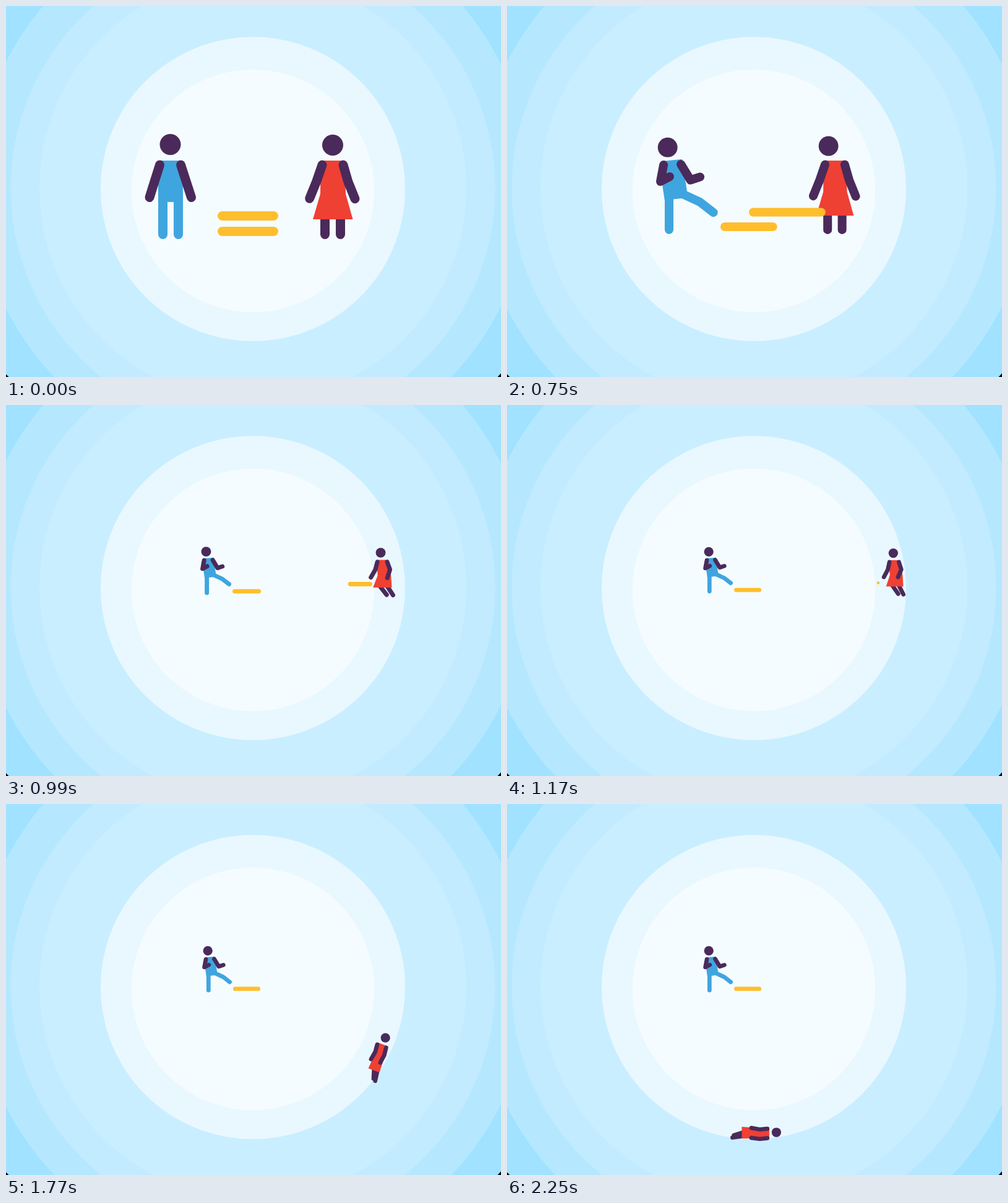
Recreate the animation shown at these times as an HTML page with a canvas. Size 800 px wide and 600 px high, loop 2700 ms.

```html
<!DOCTYPE html>
<html lang="en">
<head>
<meta charset="utf-8">
<title>Unequal</title>
<style>
  html, body { margin: 0; width: 100%; height: 100%; overflow: hidden; background: #a0e2ff; }
  canvas { display: block; width: 100vw; height: 100vh; }
</style>
</head>
<body>
<canvas id="stage" width="800" height="600"></canvas>
<script>
const ctx = document.getElementById('stage').getContext('2d');
const LOOP = 2700, STEP = 30, SLIDE = 1410, LANDED = 2250;
const SKIN = '#4a2a5a', BLUE = '#3fa5df', RED = '#ef4034', GOLD = '#ffbe2c';
const ZOOM = { x: 387.4, y: 245.6 };
const RING = { x: 399, y: 296 };
const PIVOT = { x: 528, y: 300 };
const RAD = Math.PI / 180;

// Progress from 0 to 1 between two times, and its eased forms
const part = (t, a, b) => Math.min(1, Math.max(0, (t - a) / (b - a)));
const ease = (t, a, b) => { const u = part(t, a, b); return u * u * (3 - 2 * u); };
const soft = (t, a, b) => { const u = part(t, a, b); return u ** 3 * (10 - 15 * u + 6 * u * u); };
const out = (t, a, b, power) => 1 - (1 - part(t, a, b)) ** power;

// Blend of two poses with the same parts
const mix = (a, b, u) => Object.fromEntries(Object.keys(a).map(
  part => [part, a[part].map((v, i) => v + (b[part][i] - v) * u)]));

const standing = {
  head: [265.5, 224],
  torso: [246, 250, 285, 250, 286, 303, 286, 317, 261, 317, 246, 318, 246, 290],
  armL: [248.5, 257, 240.2, 283.2, 232, 309.5],
  armR: [282.5, 257, 291, 283.2, 299.5, 309.5],
  leg: [278.5, 310, 278.5, 340, 278.5, 369.5]
};
const ready = {
  ...standing,
  armL: [248.5, 257, 239.7, 286, 255, 278],
  armR: [282.5, 257, 291, 284, 278, 279],
  leg: [278.5, 310, 278.5, 332, 279, 354]
};
const kicking = {
  head: [251, 227.5],
  torso: [244, 251, 276, 248, 284.5, 303.6, 276, 315.4, 261, 317, 246, 320, 241.5, 290],
  armL: [244, 257.7, 238.6, 286.5, 254.6, 278],
  armR: [273.9, 256.7, 290.4, 283.9, 307, 278.5],
  leg: [277, 308, 307, 322, 330, 340]
};

// Arms: angles of upper and lower part. Legs: hip x, angle, length.
const waiting = {
  head: [517, 225], armL: [-19, -22], armR: [16, 22],
  legL: [515.5, 0, 27.5], legR: [540.5, 0, 27.5],
  waist: [508, 549], hem: [496, 560.5, 345]
};
const flung = {
  head: [522.5, 225], armL: [-15, -30], armR: [20, -18],
  legL: [521, 38, 36], legR: [546, 33, 35],
  waist: [512, 558], hem: [496, 561, 345.5]
};
const pressed = {
  head: [528.5, 224.5], armL: [-8, -24], armR: [15, -31],
  legL: [524, 29, 35], legR: [544, 18, 35],
  waist: [513, 559], hem: [504, 561, 343.6]
};
const limp = {
  head: [526.5, 224.5], armL: [5, -10], armR: [6, -8],
  legL: [526, 17, 37], legR: [539.5, 8, 41],
  waist: [510, 548], hem: [506.5, 549, 349]
};

function manPose(t) {
  const pose = mix(standing, ready, ease(t, 0, 510));
  return mix(pose, kicking, ease(t, 600, 720));
}

function womanPose(t) {
  const pose = mix(waiting, flung, ease(t, 750, 990));
  return mix(mix(pose, pressed, ease(t, 990, SLIDE)), limp, ease(t, SLIDE, 1770));
}

function disc(x, y, r, color) {
  ctx.fillStyle = color;
  ctx.beginPath();
  ctx.arc(x, y, r, 0, Math.PI * 2);
  ctx.fill();
}

function trace(p) {
  ctx.beginPath();
  for (let i = 0; i < p.length; i += 2) ctx.lineTo(p[i], p[i + 1]);
}

function line(color, ...p) {
  ctx.strokeStyle = color;
  trace(p);
  ctx.stroke();
}

function shape(color, ...p) {
  ctx.fillStyle = color;
  trace(p);
  ctx.fill();
}

// Chain of [angle, length] bones; angle 0 points down
function limb(x, y, ...bones) {
  const p = [x, y];
  for (const [angle, length] of bones) {
    x += length * Math.sin(angle * RAD);
    y += length * Math.cos(angle * RAD);
    p.push(x, y);
  }
  line(SKIN, ...p);
}

function drawBackdrop() {
  ctx.fillStyle = '#a0e2ff';
  ctx.fillRect(0, 0, 800, 600);
  disc(399, 290, 446, '#b5e8ff');
  disc(399, 295, 391.5, '#c2ebff');
  disc(399, 295, 345, '#c9eeff');
  disc(RING.x, RING.y, 246, '#e9f8ff');
  disc(399, 299, 196, '#f5fcff');
  shape('#000', 0, 595.5, 4.5, 600, 0, 600);
  shape('#000', 800, 594, 800, 600, 794.5, 600);
}

function drawMan(t) {
  const { head, torso, armL, armR, leg } = manPose(t);
  line(BLUE, 253.5, 312, 253.5, 369.5);
  line(BLUE, ...leg);
  shape(BLUE, ...torso);
  line(SKIN, ...armL);
  line(SKIN, ...armR);
  disc(...head, 17, SKIN);
}

function drawWoman(t) {
  const { head, armL, armR, legL, legR, waist, hem } = womanPose(t);
  const turnAway = 11 * (1 - ease(t, 0, 510));
  const sway = 6.5 * ease(t, 1770, LANDED) - 4 * ease(t, SLIDE, 1770);
  for (const [hip, angle, length] of [legL, legR]) limb(hip, 342, [angle, length]);
  shape(RED, 508.5 + sway, 250, 547.5 + sway, 250,
    waist[1], 304, hem[1], hem[2], hem[0], hem[2], waist[0], 304);
  for (const [x, [upper, lower]] of [[511, armL], [545, armR]])
    limb(x + sway, 257, [upper, 28], [lower, 30]);
  disc(head[0] + turnAway, head[1], 17, SKIN);
}

// She is thrown to the right, then slides down inside the ring.
function womanAnchor(t, s) {
  if (t < SLIDE) {
    const u = out(t, 745, 1430, 4);
    return [ZOOM.x + s * (PIVOT.x + 398 * u - ZOOM.x),
      ZOOM.y + s * (PIVOT.y + 7.5 * u - ZOOM.y)];
  }
  const u = soft(t, SLIDE, LANDED), a = (95 * u - 5.6) * RAD, r = 231.6 + 4.1 * u;
  return [RING.x + r * Math.cos(a), RING.y + r * Math.sin(a)];
}

function drawBars(t) {
  line(GOLD, 349.5, 364.5, 432.5, 364.5);
  const rear = 342 + 524 * out(t, 725, 1245, 2);
  const front = 440 + 426 * out(t, 714, 1228, 3);
  const cap = Math.min(7.5, (front - rear) / 2);
  if (cap < .5) return;
  ctx.lineWidth = cap * 2;
  line(GOLD, rear + cap, 339.5, front - cap, 339.5);
}

function place(x, y, s, angle, pivot, paint) {
  ctx.save();
  ctx.translate(x, y);
  ctx.rotate(angle);
  ctx.scale(s, s);
  ctx.translate(-pivot.x, -pivot.y);
  paint();
  ctx.restore();
}

function draw(t) {
  const s = 1 - .551 / (1 + Math.exp((842 - t) / 45));
  const turn = 90 * RAD * soft(t, SLIDE, LANDED) ** 1.5;
  ctx.lineWidth = 15;
  ctx.lineCap = ctx.lineJoin = 'round';
  drawBackdrop();
  place(ZOOM.x, ZOOM.y, s, 0, ZOOM, () => drawMan(t));
  place(...womanAnchor(t, s), s, turn, PIVOT, () => drawWoman(t));
  place(ZOOM.x, ZOOM.y, s, 0, ZOOM, () => drawBars(t));
}

const start = performance.now();
function tick() {
  const t = (performance.now() - start) % LOOP;
  draw(Math.floor(t / STEP) * STEP);
  requestAnimationFrame(tick);
}
tick();
</script>
</body>
</html>
```
